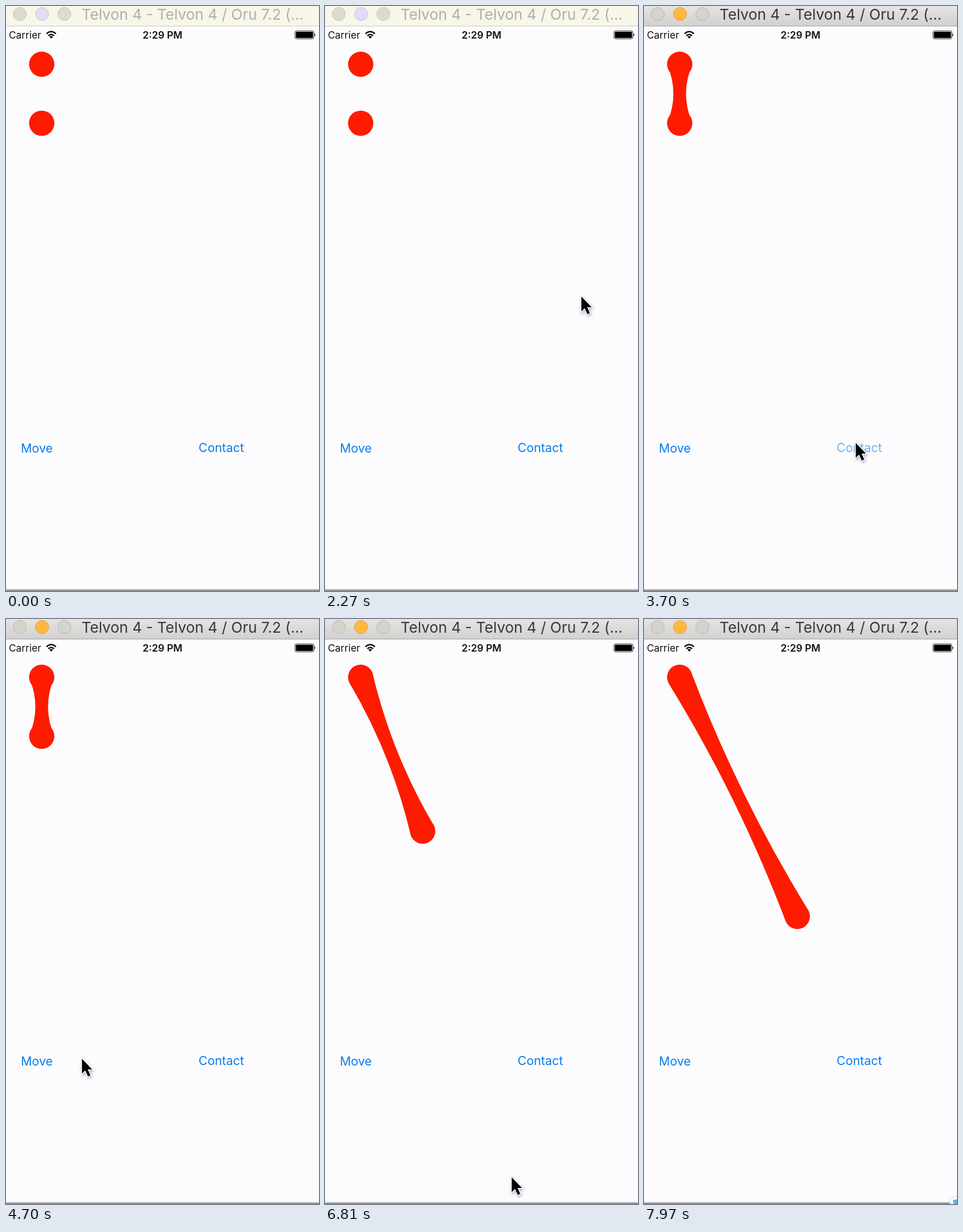
These frames come from a looping animation (547 px wide and 1023 px high, 8 s). An HTML page:

```html
<!DOCTYPE html>
<html lang="en">
<head>
<meta charset="utf-8">
<title>Sticky dots</title>
<style>
  html, body { margin: 0; width: 100%; height: 100%; overflow: hidden; background: #fcfcfe; }
  svg { display: block; width: 547px; height: 1023px; font-family: Inter, Roboto, sans-serif; }
  .button { font-size: 21.4px; fill: #087ced; }
  .status { font-size: 17.3px; fill: #111; }
  #cursor { filter: drop-shadow(1px 2px 2px rgba(40, 30, 90, .4)); }
</style>
</head>
<body>
<svg viewBox="0 0 547 1023">
  <defs>
    <linearGradient id="barActive" x2="0" y2="1">
      <stop offset="0" stop-color="#e6e4e2"/>
      <stop offset="1" stop-color="#d2d0d0"/>
    </linearGradient>
  </defs>

  <rect id="bar" width="547" height="35"/>
  <rect id="barLine" y="34.5" width="547" height="1.2"/>
  <g id="lights" stroke-width="1">
    <circle cx="24" cy="14" r="11.5"/>
    <circle cx="63" cy="14" r="11.5"/>
    <circle cx="102" cy="14" r="11.5"/>
  </g>
  <text id="title" x="132" y="24" font-size="26">Telvon 4 - Telvon 4 / Oru 7.2 (...</text>

  <text class="status" x="5" y="57">Carrier</text>
  <g fill="none" stroke="#111" stroke-width="2.5">
    <path d="M70.8 48.6Q79 41 87.2 48.6M74 52Q79 47.4 84 52"/>
    <path d="M79 57L75.8 53.8Q79 51.3 82.2 53.8Z" fill="#111" stroke="none"/>
  </g>
  <text class="status" x="273.5" y="57" text-anchor="middle" font-weight="600">2:29 PM</text>
  <rect x="505" y="43.5" width="33" height="14" rx="2.5" fill="none" stroke="#333"/>
  <rect x="506.5" y="45" width="30" height="11" rx="1" fill="#000"/>
  <path d="M539 48Q542 50.5 539 53Z" fill="#111"/>

  <path id="blob" fill="#fe1b00"/>
  <text id="move" class="button" x="26" y="781">Move</text>
  <text id="contact" class="button" x="336.5" y="780">Contact</text>

  <rect y="1019" width="547" height="2" fill="#d8d8da"/>
  <rect y="1021" width="547" height="2" fill="#8c8c86"/>
  <g id="corner">
    <path d="M534 1013L547 1009V1023H535Z" fill="#fff" stroke="#d8d8de"/>
    <path d="M540 1016L547 1015V1023H541Z" fill="#58b4dc"/>
  </g>
  <path id="cursor" d="M0 0V26L5.8 20.4L10.6 31L15 29L10.2 18.8H18Z"
    fill="#000" stroke="#fff" stroke-width="3" paint-order="stroke"/>
</svg>
<script>
const LOOP = 8000, R = 22.1;
const CONTACT_DOWN = 3480, CONTACT_UP = 3580;
const MOVE_DOWN = 5184, MOVE_UP = 5284, MOVE_TIME = 3000;
const top0 = [62.4, 101.9], low0 = [62.4, 205], travel = [210, 322];

// time, x, y
const path = [
  [500, 560, 330], [830, 500, 430], [1500, 448, 508], [2450, 448, 508],
  [2750, 420, 590], [3050, 382, 725], [3300, 370, 764], [4050, 370, 764],
  [4250, 330, 767], [4700, 133, 769], [4850, 85, 772], [5000, 62, 773],
  [6150, 62, 773], [6350, 110, 815], [6810, 326, 976], [7020, 390, 1030]
];

const $ = id => document.getElementById(id);
const clamp = v => Math.max(0, Math.min(1, v));
const set = (el, attrs) => { for (const k in attrs) el.setAttribute(k, attrs[k]); };

// cubic-bezier(.42, 0, .58, 1)
function easeInOut(x) {
  let lo = 0, hi = 1, s = .5;
  for (let i = 0; i < 24; i++) {
    s = (lo + hi) / 2;
    const bx = 3 * .42 * s * (1 - s) ** 2 + 3 * .58 * s * s * (1 - s) + s ** 3;
    if (bx < x) lo = s; else hi = s;
  }
  return s * s * (3 - 2 * s);
}

const circle = ([x, y]) => `M${x - R} ${y}a${R} ${R} 0 1 1 ${2 * R} 0a${R} ${R} 0 1 1 ${-2 * R} 0Z`;

// Both sides of the neck bend towards the midpoint of the two centres.
function neck([ax, ay], [bx, by]) {
  const d = Math.hypot(bx - ax, by - ay);
  const nx = (by - ay) / d * R, ny = -(bx - ax) / d * R;
  const mid = `${(ax + bx) / 2} ${(ay + by) / 2}`;
  return `M${ax + nx} ${ay + ny}Q${mid} ${bx + nx} ${by + ny}` +
    `L${bx - nx} ${by - ny}Q${mid} ${ax - nx} ${ay - ny}Z`;
}

function drawBlob(t) {
  const k = easeInOut(clamp((t - MOVE_UP) / MOVE_TIME));
  const low = low0.map((v, i) => v + travel[i] * k);
  const joined = t >= CONTACT_UP ? neck(top0, low) : '';
  $('blob').setAttribute('d', circle(top0) + circle(low) + joined);
}

function drawBar(active) {
  const [side, middle] = active
    ? [['#d3d4cb', '#b5b6ae'], ['#ffb840', '#e0a03c']]
    : [['#dbdbcf', '#c6c6ba'], ['#dfdcf3', '#c9c7df']];
  [side, middle, side].forEach(([fill, stroke], i) => set($('lights').children[i], { fill, stroke }));
  set($('bar'), { fill: active ? 'url(#barActive)' : '#f8f6e8' });
  set($('barLine'), { fill: active ? '#aaa8aa' : '#d0d0d0' });
  set($('title'), { fill: active ? '#39373b' : '#b0aeb0' });
}

function drawButton(id, t, down, up) {
  $(id).style.opacity = t < down ? 1 : .2 + .8 * clamp((t - up) / 250);
}

function drawCursor(t) {
  const i = path.findIndex(p => p[0] > t);
  $('cursor').style.display = i > 0 ? '' : 'none';
  if (i < 1) return;
  const [t0, x0, y0] = path[i - 1], [t1, x1, y1] = path[i];
  const k = (t - t0) / (t1 - t0);
  set($('cursor'), { transform: `translate(${x0 + (x1 - x0) * k} ${y0 + (y1 - y0) * k})` });
}

function frame(now) {
  const t = now % LOOP;
  drawBar(t >= CONTACT_DOWN);
  drawBlob(t);
  drawButton('contact', t, CONTACT_DOWN, CONTACT_UP);
  drawButton('move', t, MOVE_DOWN, MOVE_UP);
  drawCursor(t);
  $('corner').style.display = t >= 7800 ? '' : 'none';
}

const start = performance.now();
function tick() {
  frame(performance.now() - start);
  requestAnimationFrame(tick);
}
tick();
</script>
</body>
</html>
```
